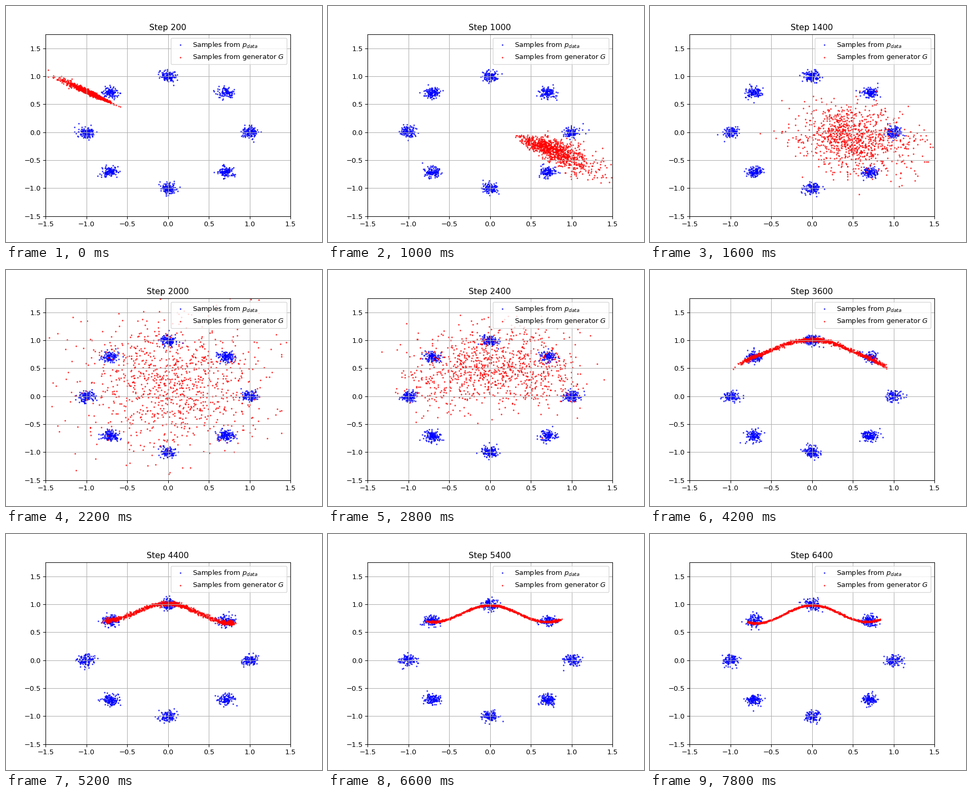
These frames come from a looping animation (600x450 px, 8000 ms). A matplotlib script:

```python
import numpy as np
import matplotlib.pyplot as plt
from matplotlib.animation import FuncAnimation

COUNT = 1000
SLOT_MS = 200
SLOTS = 40
STEP = 200


# Each shape maps a pair of normal variables (u, v) to points (x, y).
def streak(center, length, bend, slope, width, flare):
    def place(u, v):
        dx = length * u + bend * (u**2 - 1)
        return center[0] + dx, center[1] + slope * dx + (width + flare * u) * v

    return place


def cloud(u, v):
    return 0.05 + 0.55 * u, 0.2 + 0.57 * v


def arc(top, amp, half, tilt, shift, pull, tail, width):
    """Cosine hump whose samples gather around x = -0.7, 0 and 0.7."""
    def place(u, v):
        x = 0.35 * (np.tanh(pull * (u + 0.6)) + np.tanh(pull * (u - 0.6)))
        x = x + shift + tail * u
        y = top - amp * (1 - np.cos(np.pi * x / half)) + tilt * x
        return x, y + width * v

    return place


# shapes and the training step at which the generator reaches them
KEYS = [
    (200, streak((-0.97, 0.712), 0.14, -0.01, -0.67, 0.02, -0.005)),
    (1000, streak((0.8, -0.34), 0.225, 0.02, -0.55, 0.1, 0.025)),
    (2000, cloud),
    (3000, arc(1.01, 0.85, 2.5, -0.02, 0.01, 1.4, 0.095, 0.017)),
    (4400, arc(1.015, 0.165, 0.78, -0.03, 0.015, 2.0, 0.035, 0.019)),
    (5400, arc(0.985, 0.15, 0.7, 0.0, 0.05, 2.1, 0.04, 0.008)),
    (6400, arc(0.985, 0.155, 0.68, 0.02, 0.02, 2.1, 0.04, 0.007)),
]


def step_at(slot):
    # every fourth picture after the first stays for two slots
    return STEP * (slot - (slot + 3) // 5 + 1)


def data_samples(rng):
    angle = rng.integers(0, 8, COUNT) * np.pi / 4
    centers = np.column_stack([np.cos(angle), np.sin(angle)])
    return centers + rng.normal(0, 0.05, (COUNT, 2))


def generator_samples(step, rng):
    u, v = rng.normal(size=(2, COUNT))
    for (s0, start), (s1, end) in zip(KEYS, KEYS[1:]):
        if step <= s1:
            break
    mix = (step - s0) / (s1 - s0)
    a = np.column_stack(start(u, v))
    b = np.column_stack(end(u, v))
    return a + (b - a) * mix


# 600 x 450 pixels
fig, ax = plt.subplots(figsize=(6.4, 4.8), dpi=93.75)
style = dict(s=2, alpha=0.6)
real = ax.scatter([], [], color="blue", label=r"Samples from $p_{data}$", **style)
fake = ax.scatter([], [], color="red", label=r"Samples from generator $G$", **style)
ax.set_xlim(-1.5, 1.5)
ax.set_ylim(-1.5, 1.75)
ax.grid(True)
ax.legend(loc="upper right")
title = ax.set_title("")


def draw(slot):
    step = step_at(slot)
    rng = np.random.default_rng(step)
    real.set_offsets(data_samples(rng))
    fake.set_offsets(generator_samples(step, rng))
    title.set_text(f"Step {step}")
    return real, fake, title


anim = FuncAnimation(fig, draw, frames=SLOTS, interval=SLOT_MS,
                     repeat=True, repeat_delay=0)
plt.show()
```
